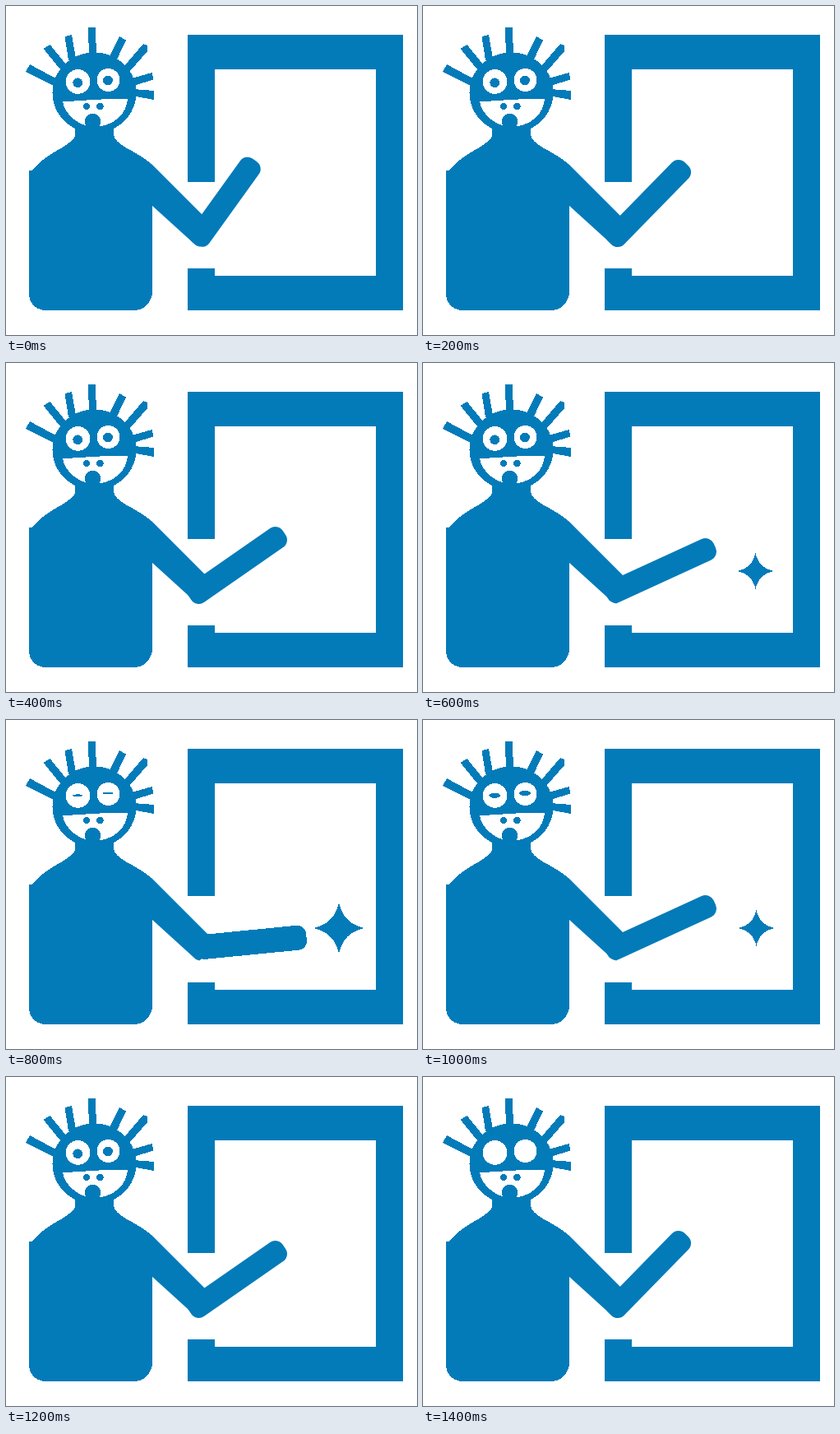
An HTML page for the animation above (1600 ms loop, 500 px wide and 400 px high).

```html
<!DOCTYPE html>
<html lang="en">
<head>
<meta charset="utf-8">
<title>Waving at the window</title>
<style>
  html, body { margin: 0; width: 100%; height: 100%; overflow: hidden; background: #fff; }
  svg { display: block; width: 500px; height: 400px; fill: #037bb9; }
  .white { fill: #fff; }
  .crisp { shape-rendering: crispEdges; }
</style>
</head>
<body>
<svg viewBox="0 0 500 400">
  <!-- window frame -->
  <path d="M221 35H483V370H221V319H254V328H450V77H254V214H221Z"/>

  <g class="crisp">
    <!-- hair -->
    <path d="M29 71L66 91L62 99L24 80Z"/>
    <path d="M45.500 52L53.500 47L74 72L66 77Z"/>
    <path d="M71.500 37L80 35L85 64L76 66Z"/>
    <path d="M100 26H109L110 62H101Z"/>
    <path d="M138 37L146 41.500L134 67L125 63Z"/>
    <path d="M167 46L172 48L172 55L151 79L143 74Z"/>
    <path d="M177.500 81L179.500 89.500L155 97L153 88Z"/>
    <path d="M180 103L179.500 114L153 109L155 101Z"/>

    <!-- head -->
    <ellipse cx="107.500" cy="105.500" rx="51" ry="49"/>
    <path class="white" d="M69 116.500Q108 113 148 112.500C147 131 131 147 106 147C88 146 71 131 69 116.500Z"/>
    <circle cx="98" cy="122" r="4"/>
    <circle cx="114.500" cy="122" r="4.300"/>
    <circle cx="105.500" cy="140.500" r="9.800"/>
    <circle class="white" cx="87.500" cy="92" r="14.800"/>
    <circle class="white" cx="124.500" cy="90" r="14"/>
    <ellipse id="left" cx="87.200"/>
    <ellipse id="right" cx="124"/>

    <!-- body -->
    <path d="M84 148H131V157Q132 164 147 173Q165 182 178 193V347A22 23 0 0 1 156 370H47A20 20 0 0 1 28 350V200H32Q40 189 58 178Q84 164 84 157Z"/>
  </g>

  <!-- arm -->
  <path d="M177 192L246 261L242 288L235 292.500L231 291L177 242Z"/>
  <rect id="forearm" rx="11"/>

  <path id="star" class="crisp" d="M0-22Q4-4 22 0Q4 4 0 22Q-4 4-22 0Q-4-4 0-22Z"/>
</svg>
<script>
const STEP = 200;
const $ = id => document.getElementById(id);

// elbow end x, y, hand end x, y, width
const high = [229.6, 289, 302.7, 187.5, 28];
const raised = [227, 287.8, 320.6, 192.2, 28];
const middle = [223.8, 285.8, 338.3, 206.2, 28];
const low = [223, 282.5, 354.8, 222.1, 28];
const flat = [230, 277, 365.5, 263.7, 30];

// pupil radii
const open = [5.9, 5.9], narrow = [7, 3], shut = [6, 1.4], blank = [0, 0];

// star x and scale
const noStar = [404, 0];

const steps = [
  [high, open, noStar],
  [raised, open, noStar],
  [middle, open, noStar],
  [low, open, [404.5, 1]],
  [flat, shut, [405, 1.4]],
  [low, narrow, [405.5, 1]],
  [middle, open, noStar],
  [raised, blank, noStar]
];

function set(id, attrs) {
  for (const name in attrs) $(id).setAttribute(name, attrs[name]);
}

function draw([arm, [rx, ry], [starX, scale]]) {
  const [ex, ey, hx, hy, width] = arm;
  const angle = Math.atan2(hy - ey, hx - ex) * 180 / Math.PI;
  set("forearm", {
    y: -width / 2,
    width: Math.hypot(hx - ex, hy - ey),
    height: width,
    transform: `translate(${ex} ${ey}) rotate(${angle})`,
    class: arm === flat ? "crisp" : ""
  });

  const lid = rx === ry ? 0 : -1.5;
  set("left", { cy: 93.3 + lid, rx, ry });
  set("right", { cy: 90.5 + lid, rx, ry });

  set("star", {
    visibility: scale ? "visible" : "hidden",
    transform: `translate(${starX} 253) scale(${scale})`
  });
}

let current = -1;
const start = performance.now();

function tick() {
  const elapsed = Math.max(0, performance.now() - start);
  const index = Math.floor(elapsed / STEP) % steps.length;
  if (index !== current) draw(steps[current = index]);
  requestAnimationFrame(tick);
}
tick();
</script>
</body>
</html>
```
